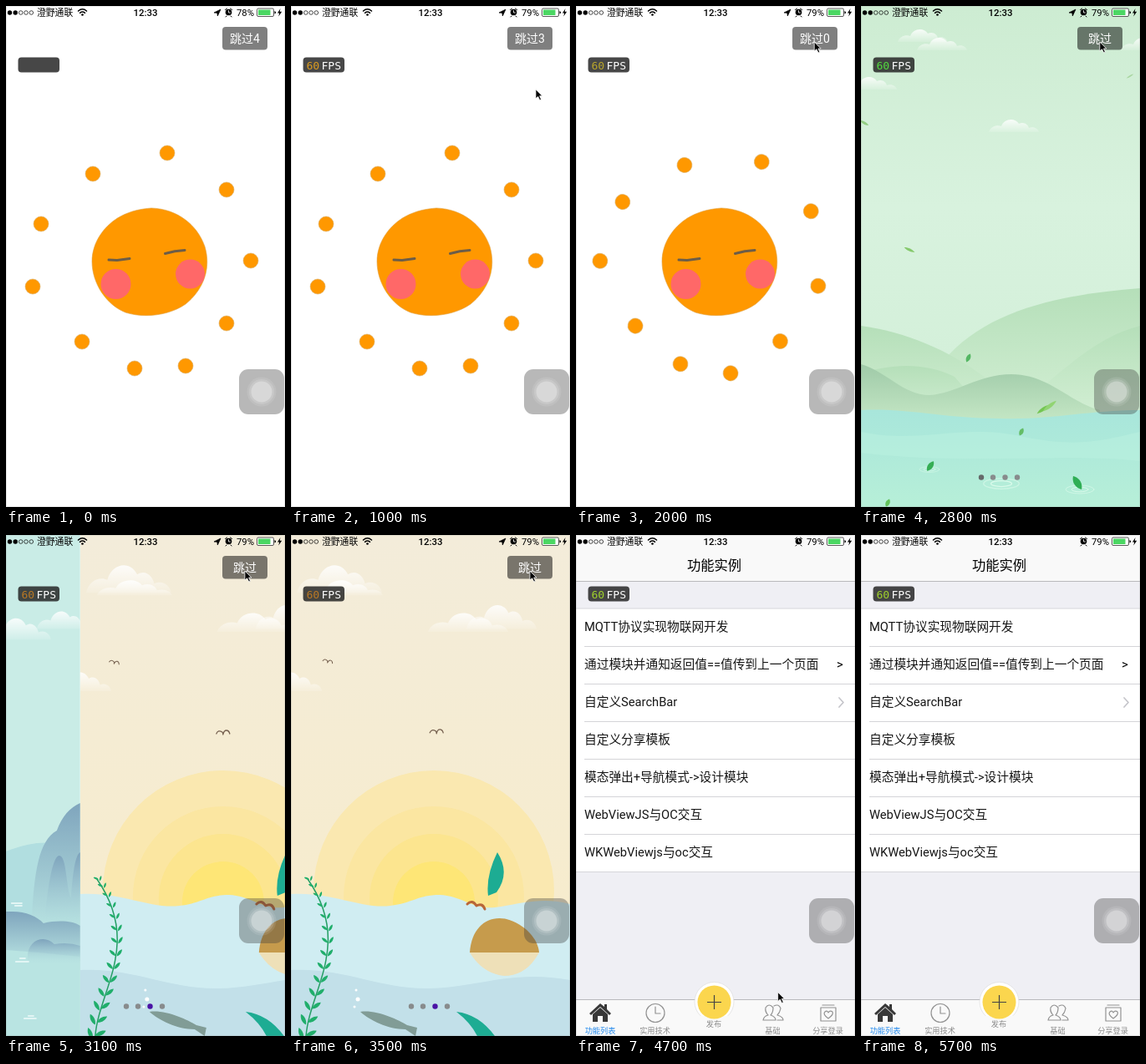
Recreate the animation shown at these times as an HTML page. Size 334x600 px, loop 5.8 s.

```html
<!DOCTYPE html>
<html lang="zh">
<head>
<meta charset="utf-8">
<title>App walkthrough</title>
<style>
html, body { margin: 0; height: 100%; overflow: hidden; background: #fff; }
#stage { display: block; width: 100vw; height: 100vh; }
text { font-family: Roboto, "Noto Sans CJK SC", "Noto Sans CJK", sans-serif; }
.mid { text-anchor: middle; }
.mono { font: 13px "DejaVu Sans Mono", monospace; }
.hand { fill: #fff; }
.ink { stroke: #555; stroke-width: 1.1; fill: #fff; stroke-linejoin: round; }
.line { fill: none; stroke-linecap: round; stroke-linejoin: round; }
</style>
</head>
<body>
<svg id="stage" viewBox="0 0 334 600" preserveAspectRatio="none">
<defs>
  <linearGradient id="cloudFill" x2="0" y2="1"><stop stop-color="#fff" stop-opacity=".85"/><stop offset="1" stop-color="#fff" stop-opacity=".12"/></linearGradient>
  <linearGradient id="mint" x2="0" y2="1"><stop stop-color="#cdecd2"/><stop offset=".4" stop-color="#d8f2de"/><stop offset="1" stop-color="#d0eed6"/></linearGradient>
  <linearGradient id="hill" x2="0" y2="1"><stop stop-color="#b5dfb9"/><stop offset="1" stop-color="#d5f0d6"/></linearGradient>
  <linearGradient id="nearHill" x2="0" y2="1"><stop stop-color="#9fcaa8"/><stop offset="1" stop-color="#c6e8c6"/></linearGradient>
  <linearGradient id="pond" x2="0" y2="1"><stop stop-color="#a8e6db"/><stop offset="1" stop-color="#b7efd8"/></linearGradient>
  <linearGradient id="rock" x2="0" y2="1"><stop stop-color="#7fa5bd"/><stop offset="1" stop-color="#b7e2e1"/></linearGradient>
  <linearGradient id="shade" x2="0" y2="1"><stop stop-color="#7397b5" stop-opacity=".75"/><stop offset="1" stop-color="#a9d2da" stop-opacity="0"/></linearGradient>
  <linearGradient id="cream" x2="0" y2="1"><stop stop-color="#f3ecda"/><stop offset="1" stop-color="#f8ecc9"/></linearGradient>
  <path id="cloud" d="M0 16C2 9 10 7 15 9C18 0 31-2 36 6C42 3 47 7 48 11C54 9 59 12 60 16Z" fill="url(#cloudFill)"/>
  <path id="leaf" d="M0-10C6-4 6 4 0 10C-6 4-6-4 0-10Z"/>
  <path id="bird" class="line" d="M-8 2Q-6-3-1 0Q0 1 0 3Q1-2 4-2Q7-2 8 2" stroke="#75604f" stroke-width="1.3"/>
  <g id="ripple" class="line" stroke="#d9faea"><ellipse rx="17" ry="5" opacity=".7"/><ellipse rx="10" ry="2.8"/></g>
  <g id="head">
    <ellipse class="ink" rx="9" ry="30" transform="translate(-14-46)rotate(-6)"/>
    <ellipse class="ink" rx="9" ry="29" transform="translate(-33-24)rotate(-34)"/>
    <ellipse class="ink" rx="24" ry="22"/>
    <circle cx="1" cy="2" r="17" fill="#f8c8ca" stroke="#666"/>
    <path class="line" d="M-7-5l3 2M7-7l3 2M-2 8q3 3 6 0" stroke="#885558"/>
    <g fill="#e98f96"><circle cx="-9" cy="4" r="2"/><circle cx="11" cy="3" r="2"/><circle cx="2" cy="0" r="1"/></g>
  </g>
  <path id="arcLeft" d="M15 156Q56 143 66 92"/>
  <path id="arcRight" d="M271 104Q284 146 330 156"/>
</defs>

<g id="sun">
  <path fill="#fff" d="M0 0H334V600H0Z"/>
  <g id="rays" fill="#ff9800" stroke="#d9b06a" stroke-opacity=".6"></g>
  <path d="M174 242C205 243 229 262 238 288C246 315 236 340 215 357C195 371 165 374 143 367C120 358 103 332 103 306C103 281 120 261 137 252C150 245 162 243 174 242Z" fill="#ff9800" stroke="#e0a040" stroke-opacity=".6"/>
  <circle cx="131.5" cy="333" r="18" fill="#ff6868"/><circle cx="220.5" cy="321" r="17.5" fill="#ff6868"/>
  <path class="line" d="M123 304L133 304.500L148 302.500M190.500 296.500L202 293.800L214 292.500" stroke="#6c5d48" stroke-width="3"/>
</g>

<g id="guide">
 <g id="pages">
  <svg width="334" height="600">
    <path fill="url(#mint)" d="M0 0H334V600H0Z"/>
    <g id="mintClouds"></g>
    <path fill="url(#hill)" d="M98 426C150 362 245 345 334 338V500H60Z"/>
    <path fill="url(#hill)" d="M0 383C50 390 105 410 155 450L180 500H0Z"/>
    <path fill="url(#hill)" d="M0 440C35 429 75 426 112 444L160 500H0Z"/>
    <path fill="url(#hill)" d="M215 458C255 424 290 394 334 383V500H215Z"/>
    <path fill="url(#nearHill)" d="M0 429C30 437 50 466 82 466C115 464 140 441 180 441C225 441 250 475 286 484V500H0Z"/>
    <path fill="url(#pond)" d="M0 484C55 481 100 494 165 494C230 496 270 484 334 484V600H0Z"/>
    <path fill="#bdf2df" opacity=".45" d="M0 510C70 525 120 500 190 515S290 520 334 510V545C250 535 120 550 0 535Z"/>
    <g id="ripples"></g>
    <g id="leaves"></g>
  </svg>
  <svg x="334" width="334" height="600">
    <path fill="#c9ece6" d="M0 0H334V600H0Z"/>
    <path fill="#b1dee0" d="M0 381Q60 370 130 383T250 377T334 381V600H0Z"/>
    <g id="lakeClouds"></g>
    <path fill="url(#rock)" d="M276 460C279 405 284 366 306 354C312 337 322 326 334 321V470H276Z"/>
    <path fill="url(#shade)" d="M292 455C297 405 303 384 309 384C318 384 317 424 323 435C325 405 328 383 334 380V460H292Z"/>
    <path fill="url(#rock)" d="M60 455C65 410 95 390 120 420Q150 425 164 460Z"/>
    <path fill="url(#rock)" d="M180 500C200 458 223 451 249 451C267 450 282 456 290 465C307 461 325 462 334 468V510H180Z"/>
    <path fill="#b9e4e2" d="M0 500Q160 485 334 505V600H0Z"/>
    <path fill="url(#shade)" d="M271 507C270 484 292 478 303 490Q320 487 334 492V513H271Z"/>
    <path class="line" d="M252 441h12m-8 3h8M257 511h15m-10-4h6M267 579h14m-9-3h6" stroke="#e2f5f4" stroke-width="2"/>
  </svg>
  <svg x="668" width="334" height="600">
    <path fill="url(#cream)" d="M0 0H334V600H0Z"/>
    <g id="creamClouds"></g>
    <circle cx="171" cy="426" r="144" fill="#fae8b0"/><circle cx="171" cy="433" r="108" fill="#fbe6a1"/>
    <circle cx="171" cy="435" r="77" fill="#fce58f"/><circle cx="171" cy="440" r="49" fill="#fee676"/>
    <g id="birds"></g>
    <path fill="#d0edf2" d="M0 430C50 427 82 448 119 444C145 441 152 431 178 431C204 432 219 449 244 446S300 432 334 442V600H0Z"/>
    <path fill="#c2e0e9" d="M0 521C65 518 105 544 165 543S265 520 334 533V600H0Z"/>
    <path fill="#c69b4c" d="M214 500C216 470 235 455 258 460C280 466 296 484 297 500Z"/>
    <path fill="#eee0b8" d="M214 500H297Q282 528 255 528Q229 525 214 500Z"/>
    <path class="line" d="M211 442q6-6 11 2q7-4 10 4" stroke="#b86639" stroke-width="3"/>
    <path fill="#1dac93" d="M236 432Q233 408 247 380Q263 405 246 428ZM244 600Q225 574 198 571Q215 584 223 600Z"/>
    <path class="line" d="M18 600C22 545 74 490 20 412" stroke="#249e64" stroke-width="1.5"/>
    <g id="weed" fill="#20ae6b"></g>
    <path fill="#819c96" d="M83 571C101 568 128 580 139 587L151 590L149 600L137 592C116 592 94 581 83 571Z"/>
    <g fill="#fff"><circle cx="80" cy="556" r="2.5"/><circle cx="78" cy="545" r="1.5"/><circle cx="76" cy="565" r="1.5"/></g>
  </svg>
 </g>
 <g id="pager"></g>
</g>

<g id="login">
  <path fill="#ffc0c9" d="M0 0H334V600H0Z"/>
  <path class="ink" d="M-2 124Q15 115 38 127L34 133Q18 128 12 134L9 152H-2ZM336 116Q313 118 295 121L277 100L272 103Q283 124 297 132L321 130L326 150H336Z"/>
  <path class="ink" d="M266 484C262 492 255 508 259 516L266 513L268 531H278L279 519H284L285 531H294L293 513L298 488Z"/>
  <path d="M281 480h14l-4 9h-8Z" fill="#b52e35"/>
  <path class="ink" d="M270 600Q273 590 288 590Q303 590 307 602Z"/>
  <ellipse class="ink" rx="9" ry="23" transform="translate(309 437)rotate(46)"/>
  <ellipse class="ink" rx="11" ry="31" transform="translate(286 424)rotate(38)"/>
  <g id="smallHeads"></g>
  <path class="ink" d="M154 277C142 294 127 298 124 307C124 313 133 313 140 310L161 297C169 312 176 317 179 326L179 342Q177 347 184 346H190Q193 345 192 340L194 312C207 309 219 316 229 317Q235 316 235 308C222 304 207 292 198 283C191 274 178 268 169 263L177 238Q181 222 172 222Q166 224 167 238L161 260Z"/>
  <path d="M184 316L185 336M175 298Q185 306 200 305" class="line" stroke="#e6e5f1" stroke-width="4"/>
  <use href="#head" transform="translate(143 261)"/>
  <g class="hand">
    <text x="145" y="190" font-size="17.5" letter-spacing="1">时间看上面</text>
    <text x="145" y="212" font-size="17.5" letter-spacing="1">到点吃饭了</text>
    <text x="191" y="572" font-size="12">萌值又提高了</text>
    <text x="191" y="588" font-size="12">来张自拍嘀嘀</text>
    <g font-size="12" letter-spacing="2.5">
      <text><textPath href="#arcLeft">这里看信号</textPath></text>
      <text><textPath href="#arcRight">这里看电量</textPath></text>
    </g>
  </g>
  <path class="line" d="M61 88Q63 52 45 26M43 36L45 26L54 30M273 75Q270 49 296 26M286 27L296 26L294 36" stroke="#fff" stroke-width="2"/>
  <path d="M23 310.500H308M23 383.500H308" stroke="#282023"/>
  <rect x="23.5" y="438.5" width="284" height="45" rx="8" fill="#f96a21"/>
  <text class="mid" x="166" y="467" font-size="16.5" fill="#fff">登陆</text>
</g>

<g id="list">
  <path fill="#efeff4" d="M0 0H334V600H0Z"/>
  <path fill="#f9f9f9" d="M0 0H334V55H0ZM0 556H334V600H0Z"/>
  <path fill="#fff" d="M0 88H334V403H0Z"/>
  <path d="M0 55.500H334M0 556.500H334" stroke="#b9b9bc"/>
  <path d="M0 88H334M0 403.500H334" stroke="#d6d6da"/>
  <text class="mid" x="165.5" y="42" font-size="16.3" font-weight="500">功能实例</text>
  <g id="rows" font-size="14.7" fill="#161616"></g>
  <text x="312" y="160" font-size="15">&gt;</text>
  <path class="line" d="M315 195L320 200.500L315 206" stroke="#c5c5ca" stroke-width="1.7"/>
  <circle cx="165.5" cy="559" r="23.5" fill="#fff" stroke="#ddd" stroke-width=".7"/>
  <path fill="#f9f9f9" d="M140 576H191V600H140Z"/>
  <circle cx="165.5" cy="559.5" r="20" fill="#fbd64e"/>
  <path d="M157 559.500H174M165.500 551V568" stroke="#444" stroke-width="1.2"/>
  <path fill="#383838" d="M16 573L29 561L34 565V562H37V568L42 573L40 575L29 565L18 575ZM20 574L29 566L38 574V583H32V576H26V583H20Z"/>
  <g class="line" stroke="#929292" stroke-width="1.2">
    <circle cx="95" cy="572.5" r="11"/><path d="M95 565V573H101"/>
    <path d="M224 581Q225 576 230 575Q226 571 227 566Q231 560 236 566Q236 572 233 575Q239 577 239 581ZM237 564Q243 561 245 567Q244 572 241 575Q248 577 248 581H241"/>
    <path d="M293 566H311V582H293ZM295 563H309M302 579Q295 574 298 571Q301 569 302 572Q304 569 307 571Q309 574 302 579Z"/>
  </g>
  <g id="tabs" class="mid" font-size="9.2"></g>
</g>

<g id="skip">
  <rect x="259" y="25" width="54" height="27.5" rx="4" opacity=".5"/>
  <text id="skipText" class="mid" x="286" y="44" font-size="14" fill="#fff"></text>
</g>

<g id="status">
  <circle cx="4.5" cy="8" r="2.7"/><circle cx="11.2" cy="8" r="2.7"/>
  <g fill="none" stroke="#000" stroke-width=".7"><circle cx="17.7" cy="8" r="2.3"/><circle cx="24" cy="8" r="2.3"/><circle cx="30.3" cy="8" r="2.3"/></g>
  <text x="37" y="11.5" font-size="10.8">澄野通联</text>
  <path class="line" d="M86.500 6Q91.500 1.500 96.500 6M88.500 8.300Q91.500 5.800 94.500 8.300" stroke="#000" stroke-width="1.5"/><circle cx="91.5" cy="10.5" r="1.3"/>
  <text class="mid" x="167" y="11.5" font-size="11.4" font-weight="500">12:33</text>
  <path id="location" d="M249 8L257 4L253.300 12L252.800 8.300Z" stroke="#000" stroke-width=".7"/>
  <circle cx="266.5" cy="7.5" r="3.8"/><path class="line" d="M262.500 4.500l2-1.500M270.500 4.500l-2-1.500M264 12l-1 1M269 12l1 1" stroke="#000"/>
  <path class="line" d="M266.500 5.500V8H268.500" stroke="#fff" stroke-width=".8"/>
  <text id="charge" x="276" y="11.5" font-size="11.3"></text>
  <rect x="300.5" y="3" width="20" height="9.5" rx="1.5" fill="#fff" stroke="#333" stroke-width=".8"/>
  <path fill="#4bd763" d="M302 4.500H316.500V11H302Z"/><path d="M321.500 6V9.500L323 8.500V7Z"/>
  <path d="M328.500 3L325 8.500H327.200L326.300 12.500L330.200 6.800H327.700Z"/>
</g>

<rect x="14.5" y="61.5" width="49.5" height="18" rx="4" fill="#222" fill-opacity=".83"/>
<g id="fps"><text id="rate" class="mono" x="18.5" y="75.5">60</text><text class="mono" x="36.5" y="75.5" fill="#fff">FPS</text></g>

<g id="assist">
  <rect x="279" y="435" width="54" height="54" rx="11" fill="#3c3c3c" opacity=".36"/>
  <g fill="#fff"><circle cx="306" cy="462" r="17.5" opacity=".1"/><circle cx="306" cy="462" r="15" opacity=".15"/><circle cx="306" cy="462" r="12.5" opacity=".3"/></g>
</g>
<path id="cursor" d="M0 0V11L2.700 8.700L4.800 13L6.600 12.200L4.700 8H8Z" stroke="#fff" stroke-width=".8"/>
<path fill="none" stroke="#888" stroke-opacity=".18" d="M.5 .5H333.500V599.500H.5Z"/>
</svg>

<script>
const LOOP = 5800;
const $ = id => document.getElementById(id);
const fill = (id, items, render) => $(id).innerHTML = items.map(render).join('');
const put = (id, shape, items) => fill(id, items, ([x, y, turn = 0, sx = 1, sy = sx, color = '']) =>
  `<use href="#${shape}" transform="translate(${x} ${y})rotate(${turn})scale(${sx} ${sy})" ${color && `fill="${color}"`}/>`);

fill('rays', [[193,176],[264,220],[293,305],[264,380],[215,431],[154,434],[91,402],[32,336],[42,261],[104,201]],
  ([x, y]) => `<circle cx="${x}" cy="${y}" r="9"/>`);
put('mintClouds', 'cloud', [[44,27],[67,37],[-17,84],[153,135],[311,37]]);
put('lakeClouds', 'cloud', [[224,98,0,1.25,1.7],[282,90,0,1.1,1.4],[60,60]]);
put('creamClouds', 'cloud', [[7,34,0,1.7,2.2],[20,53,0,1.5,1.2],[164,92,0,1.6,1.5],[-30,163,0,1.12,1.5],[210,82,0,1.4,1.9]]);
put('ripples', 'ripple', [[168,572,0,1.25],[82,555,0,.7],[262,579]]);
put('leaves', 'leaf', [
  [128.5,421.5,25,.55,.55,'#54b763'], [58,292,-65,.35,.7,'#86c96d'],
  [218,483,55,.45,.9,'#74c652'], [226,479,52,.5,1,'#91d473'], [192,510,25,.55,.5,'#63bd66'],
  [83,551,35,.7,.7,'#35ae55'], [259,571,-32,.9,.95,'#2fae55'], [32,595,25,.55,.5,'#64c35c'],
  [4,140,-60,.35,.6,'#92cc82'], [322,84,60,.2,.5,'#a8d6a0']]);
put('birds', 'bird', [[41,152,15,.75],[171,236]]);
put('smallHeads', 'head', [[21,105,0,-.62,.62],[303,102,2,.62],[290,578,36,.58]]);

// Leaf pairs follow the curve of the stem, closer and smaller towards the tip.
const bezier = (a, b, c, d, u) => a*(1-u)**3 + 3*b*u*(1-u)**2 + 3*c*u*u*(1-u) + d*u**3;
put('weed', 'leaf', Array.from({ length: 28 }, (_, i) => {
  const u = 1 - (1 - (i >> 1) / 13.5) ** 1.4, side = i % 2 ? 1 : -1, size = .75 - .42 * u;
  return [bezier(18,22,74,20,u) + side * 8 * size, bezier(600,545,490,412,u) - 3, side * 42 + 22 - 48 * u, size * .75, size];
}));

fill('rows', ['MQTT协议实现物联网开发', '通过模块并通知返回值==值传到上一个页面', '自定义SearchBar', '自定义分享模板',
  '模态弹出+导航模式-&gt;设计模块', 'WebViewJS与OC交互', 'WKWebViewjs与oc交互'],
  (label, i) => `<text x="10" y="${115 + 45 * i}">${label}</text>` +
    (i ? `<path d="M10 ${88.5 + 45 * i}H334" stroke="#d4d4d8"/>` : ''));
fill('tabs', [['功能列表',29],['实用技术',94.5],['发布',165,589],['基础',235.5],['分享登录',301.5]],
  ([label, x, y = 597], i) => `<text x="${x}" y="${y}" fill="${i ? '#8c8c8c' : '#2188ec'}">${label}</text>`);
fill('pager', [144,158,172.5,187], x => `<circle cx="${x}" cy="564.5" r="3.2"/>`);

const cursorPath = [[700,320,508],[1000,293,100],[1800,285,43],[4200,286,43],[4430,205,465],[4620,205,465],[4920,265,600]];
const rateColors = [[0,'#d99a20'],[1500,'#b8a52c'],[2400,'#52d83e'],[2950,'#b87825'],[3800,'#c8641e'],[4700,'#9fd02c']];

const clamp = v => Math.max(0, Math.min(1, v));
const ramp = (t, start, span) => clamp((t - start) / span);
const easeOut = u => 1 - (1 - u) ** 3;
const latest = (steps, t) => steps.filter(s => s[0] <= t).pop();
const show = (id, on) => $(id).style.display = on ? '' : 'none';
const move = (id, x, y) => $(id).setAttribute('transform', `translate(${x} ${y})`);

function drawCursor(t) {
  const i = cursorPath.findIndex(p => p[0] > t);
  show('cursor', i > 0);
  if (i < 1) return;
  const [t0, x0, y0] = cursorPath[i - 1], [t1, x1, y1] = cursorPath[i];
  const u = easeOut((t - t0) / (t1 - t0));
  move('cursor', x0 + (x1 - x0) * u, y0 + (y1 - y0) * u);
}

function draw(t) {
  const swung = Math.floor(t / 400) % 2;
  $('rays').setAttribute('transform', `rotate(${swung * 13.3} 162 307)`);

  const page = easeOut(ramp(t, 2820, 180)) + easeOut(ramp(t, 3000, 283));
  move('pages', -334 * page, 0);
  move('leaves', (t - 2800) * .006, (t - 2800) * .012);
  move('birds', (t - 3100) * .008, (3100 - t) * .003);
  const active = Math.round(page);
  [...$('pager').children].forEach((dot, i) =>
    dot.setAttribute('fill', i !== active ? '#888b8c' : active ? '#4a12a5' : '#65696a'));

  const loginIn = ramp(t, 3750, 200);
  $('guide').style.opacity = ramp(t, 2300, 200);
  $('login').style.opacity = loginIn;
  $('skip').style.opacity = 1 - loginIn;
  show('sun', t < 2500);
  show('guide', t >= 2300 && t < 3950);
  show('login', t >= 3750 && t < 4600);
  show('list', t >= 4600);

  const left = latest([[0,4],[600,3],[1100,2],[1550,1],[2000,0],[2300,'']], t)[1];
  $('skipText').textContent = '跳过' + left;
  $('charge').textContent = t < 600 ? '78%' : '79%';
  show('fps', t >= 400);
  $('rate').setAttribute('fill', latest(rateColors, t)[1]);
  show('location', t < 4600);
  $('location').setAttribute('fill', t < 3850 ? '#000' : 'none');
  drawCursor(t);
}

const began = performance.now();
function tick() {
  draw((performance.now() - began) % LOOP);
  requestAnimationFrame(tick);
}
tick();
</script>
</body>
</html>
```
